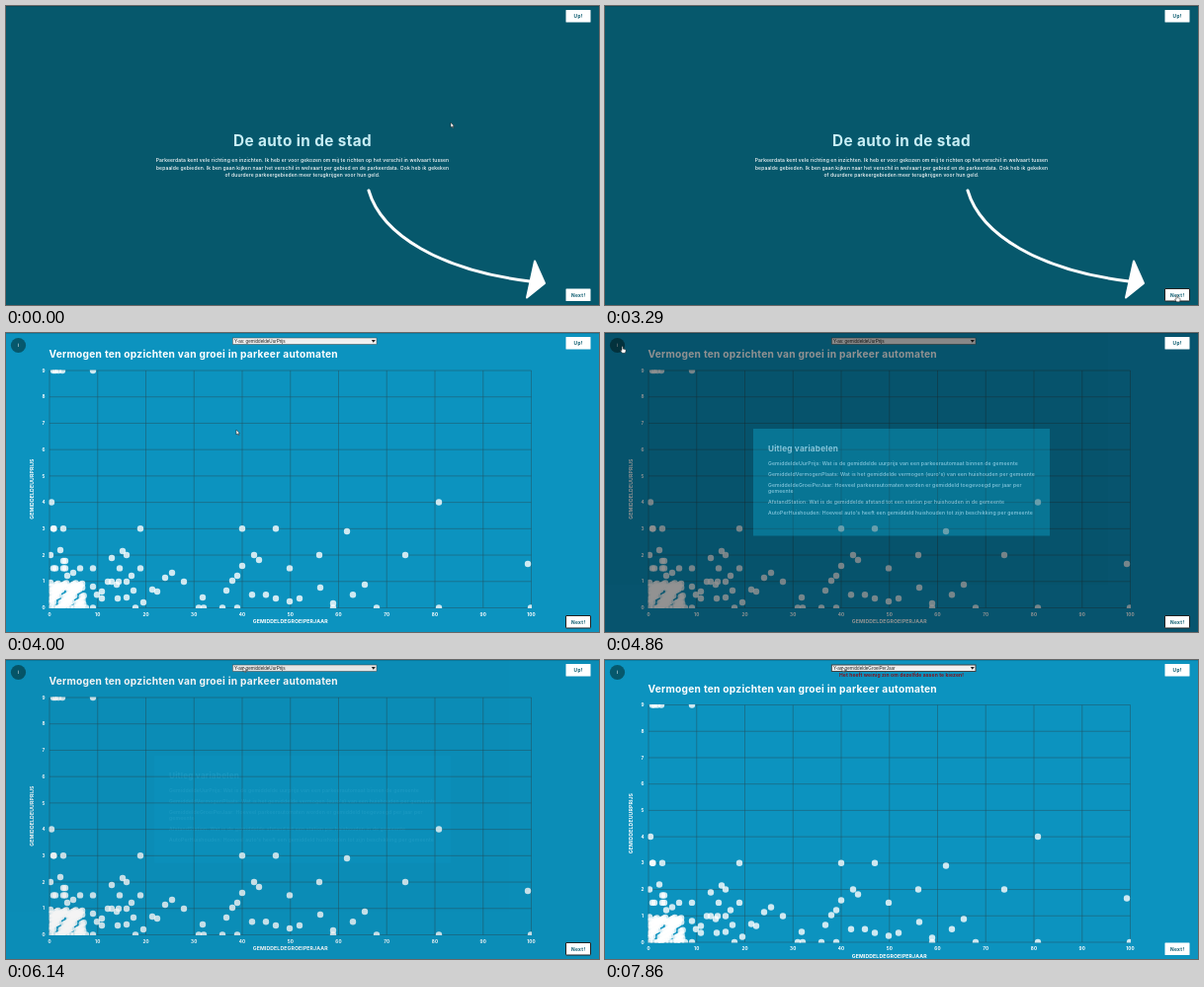
Animation of 600 by 303 pixels, one loop 8 s. Source, as an HTML page:

```html
<!DOCTYPE html>
<html lang="nl">
<head>
<meta charset="utf-8">
<style>
  html, body { margin: 0; width: 100%; height: 100%; overflow: hidden; background: #06586c; }
  svg { display: block; width: 100vw; height: 100vh; }
  text { font: 500 5px Inter, sans-serif; letter-spacing: .025em; fill: #fff; }
  .bold { font-weight: 700; }
  .mid { text-anchor: middle; }
  .tick { font-size: 4.6px; }
  .label { font-size: 5.15px; }
  .button { font-size: 4.8px; letter-spacing: .07em; fill: #06586c; }
  .option { font: 4.6px "Liberation Sans", Arial, sans-serif; letter-spacing: 0; fill: #222; }
  #error { fill: #85121a; }
  #grid { stroke: #24505f; stroke-opacity: .7; stroke-width: .7; }
  #dots { fill: #fff; fill-opacity: .8; }
  #cursor { fill: #fff; stroke: #222; stroke-width: .5; stroke-linejoin: round; }
</style>
</head>
<body>
<svg viewBox="0 0 600 303" preserveAspectRatio="none">
  <clipPath id="plot"><rect x="43.5" y="37.5" width="488.5" height="241.5"/></clipPath>
  <g id="pages">
    <rect width="600" height="304" fill="#06586c"/>
    <text class="bold mid" x="300" y="142" style="font-size:15.3px;fill:#c8eef5">De auto in de stad</text>
    <g class="mid">
      <text x="300" y="158.2">Parkeerdata kent vele richting en inzichten. Ik heb er voor gekozen om mij te richten op het verschil in welvaart tussen</text>
      <text x="300" y="165.8">bepaalde gebieden. Ik ben gaan kijken naar het verschil in welvaart per gebied en de parkeerdata. Ook heb ik gekeken</text>
      <text x="300" y="173.3">of duurdere parkeergebieden meer terugkrijgen voor hun geld.</text>
    </g>
    <path d="M367 187C380 232 440 268 530 279" fill="none" stroke="#fff" stroke-width="3" stroke-linecap="round"/>
    <path d="M535 258.500L545 281L527 295.500Z" fill="#fff" stroke="#fff" stroke-width="2" stroke-linejoin="round"/>

    <g transform="translate(0 303)">
      <rect width="600" height="303" fill="#0c93bf"/>
      <circle cx="12.5" cy="12.5" r="7.6" fill="#06586c"/>
      <text class="mid" x="12.5" y="14.2" style="font-size:4.6px">i</text>
      <rect id="select" x="229.300" y="5" width="145.700" height="6.500" fill="#f0f0f0" stroke="#444"/>
      <text id="option" class="option" x="231" y="9.800"></text>
      <path d="M369.800 7h4l-2 2.800z" fill="#222"/>
      <text id="error" class="bold mid" x="300" y="17.400">Het heeft weinig zin om dezelfde assen te kiezen!</text>
      <g id="chart">
        <text class="bold" x="43.500" y="25.400" style="font-size:10.2px">Vermogen ten opzichten van groei in parkeer automaten</text>
        <g id="grid"></g>
        <g id="ticks"></g>
        <g id="dots" clip-path="url(#plot)"></g>
        <text class="bold mid label" x="287.700" y="294.300">GEMIDDELDEGROEIPERJAAR</text>
        <text class="bold mid label" transform="translate(28.300 158) rotate(-90)">GEMIDDELDEUURPRIJS</text>
      </g>
    </g>
  </g>

  <g id="modal">
    <rect width="600" height="303" fill-opacity=".85"/>
    <rect x="150" y="97" width="300" height="108.500" fill="#06586c"/>
    <text class="bold" x="165" y="120.300" style="font-size:8.2px">Uitleg variabelen</text>
    <g id="help"></g>
  </g>

  <path d="M0 .3H600" stroke="#000" stroke-opacity=".3" stroke-width=".6"/>
  <rect x="566.500" y="4" width="25" height="12.500" rx=".5" fill="#fff"/>
  <text class="bold mid button" x="579.200" y="12.200">Up!</text>
  <rect id="next" x="566.500" y="286.500" width="25" height="12.500" rx=".5" fill="#fff" stroke="#222"/>
  <text class="bold mid button" x="579.200" y="294.700">Next!</text>
  <path id="cursor"/>
</svg>

<script>
const $ = id => document.getElementById(id);
const left = 44, bottom = 278.5, stepX = 48.75, stepY = 26.72;
const right = left + 10 * stepX, top9 = bottom - 9 * stepY;

let grid = '', ticks = '', dots = '', help = '';
const tick = (x, y, value) =>
  ticks += `<text class="bold mid tick" x="${x}" y="${y}">${value}</text>`;
const dot = (x, y) => dots += `<circle cx="${x}" cy="${y}" r="3.2"/>`;

for (let i = 0; i <= 10; i++) {
  const x = left + i * stepX;
  grid += `<path d="M${x} ${top9}V${bottom}"/>`;
  tick(x, 286.6, i * 10);
}
for (let i = 0; i <= 9; i++) {
  const y = bottom - i * stepY;
  grid += `<path d="M${left} ${y}H${right}"/>`;
  tick(38, y + 1.6, i);
}

// Points sharing a price: [y, ...x]
[
  [top9, 48, 50, 53, 57, 88],
  [171.5, 46, 438],
  [198.3, 48, 48.5, 58, 136, 239, 273],
  [225, 45, 122, 251, 317, 404],
  [238.4, 48, 50, 58, 60, 75, 88, 115, 136, 287],
  [252, 103, 107, 114, 122, 180],
  [265.2, 92, 249, 263, 351],
  [bottom, 81, 88, 131, 195, 200, 219, 234, 331, 375, 438, 531]
].forEach(([y, ...xs]) => xs.forEach(x => dot(x, y)));

[
  [345, 201], [528, 234], [256, 230], [239, 236], [234, 246], [229, 251], [363, 255],
  [318, 258], [331, 274], [273, 269], [287, 272], [297, 269], [223, 261], [199, 268],
  [168, 243], [161, 248], [148, 260], [153, 262], [139, 273], [127, 246], [129, 261],
  [118, 221], [107, 228], [112, 255], [113, 269], [122, 268], [97, 262], [97, 269],
  [55, 220], [58, 231], [60, 231], [68, 243], [62, 246], [88, 257]
].forEach(p => dot(...p));

// Dense cluster near the origin
const frac = v => v % 1;
for (let i = 0; i < 70; i++) dot(45 + 34 * frac(i * .618), 253 + 25 * frac(i * .755));
for (let i = 0; i < 14; i++) dot(46 + i * 2.4, 257 + i % 2);
for (let i = 0; i < 9; i++) dot(45 + i * 4, bottom);

[
  [134.4, 'GemiddeldeUurPrijs: Wat is de gemiddelde uurprijs van een parkeerautomaat binnen de gemeente'],
  [145.4, "GemiddeldVermogenPlaats: Wat is het gemiddelde vermogen (euro's) van een huishouden per gemeente"],
  [156.4, 'GemiddeldeGroeiPerJaar: Hoeveel parkeerautomaten worden er gemiddeld toegevoegd per jaar per'],
  [162.3, 'gemeente'],
  [173.2, 'AfstandStation: Wat is de gemiddelde afstand tot een station per huishouden in de gemeente'],
  [184.3, "AutoPerHuishouden: Hoeveel auto's heeft een gemiddeld huishouden tot zijn beschikking per gemeente"]
].forEach(([y, line]) => help += `<text class="label" x="165" y="${y}">${line}</text>`);

$('grid').innerHTML = grid;
$('ticks').innerHTML = ticks;
$('dots').innerHTML = dots;
$('help').innerHTML = help;

const ARROW = 'M0 0V5L1.200 4L2 5.800L2.800 5.400L2 3.700H3.500Z';
const HAND = 'M0 .5Q.6-.3 1.200.5V2.600L3.600 3.200Q4.300 3.500 4 5L3.400 6.800H.4L-1.400 4.200Q-1.200 3.300 0 4.200Z';
const cursorPath = [
  [0, 450, 118], [1710, 450, 118], [2710, 578, 293], [3550, 578, 293], [4000, 233, 98],
  [4430, 17, 13.5], [5710, 17, 13.5], [5860, 22.5, 12.5], [6130, 240, 7], [8000, 240, 7]
];

const between = (t, a, b) => t >= a && t < b;
const ease = (t, a, b) => {
  const p = Math.min(1, Math.max(0, (t - a) / (b - a)));
  return .5 - Math.cos(p * Math.PI) / 2;
};

function cursorAt(t) {
  const i = cursorPath.findIndex(k => k[0] > t);
  const [t0, x0, y0] = cursorPath[i - 1], [t1, x1, y1] = cursorPath[i];
  const p = ease(t, t0, t1);
  return `translate(${x0 + (x1 - x0) * p} ${y0 + (y1 - y0) * p})`;
}

function draw() {
  const t = performance.now() % 8000;
  const sameAxes = t >= 7430, selectFocus = t >= 6860;

  $('pages').setAttribute('transform', `translate(0 ${-303 * ease(t, 3330, 3900)})`);
  $('modal').setAttribute('opacity', ease(t, 4660, 5060) - ease(t, 5800, 6200));
  $('chart').setAttribute('transform', `translate(0 ${sameAxes ? 7.5 : 0})`);
  $('error').setAttribute('opacity', sameAxes ? 1 : 0);
  $('option').textContent = 'Y-as: gemiddelde' + (sameAxes ? 'GroeiPerJaar' : 'UurPrijs');
  $('select').setAttribute('stroke-width', selectFocus ? 1 : .5);
  $('next').setAttribute('stroke-width', between(t, 3270, 6860) ? 1 : 0);
  $('cursor').setAttribute('transform', cursorAt(t));
  $('cursor').setAttribute('d', between(t, 2650, 3620) || between(t, 4400, 5950) ? HAND : ARROW);
  requestAnimationFrame(draw);
}
draw();
</script>
</body>
</html>
```
